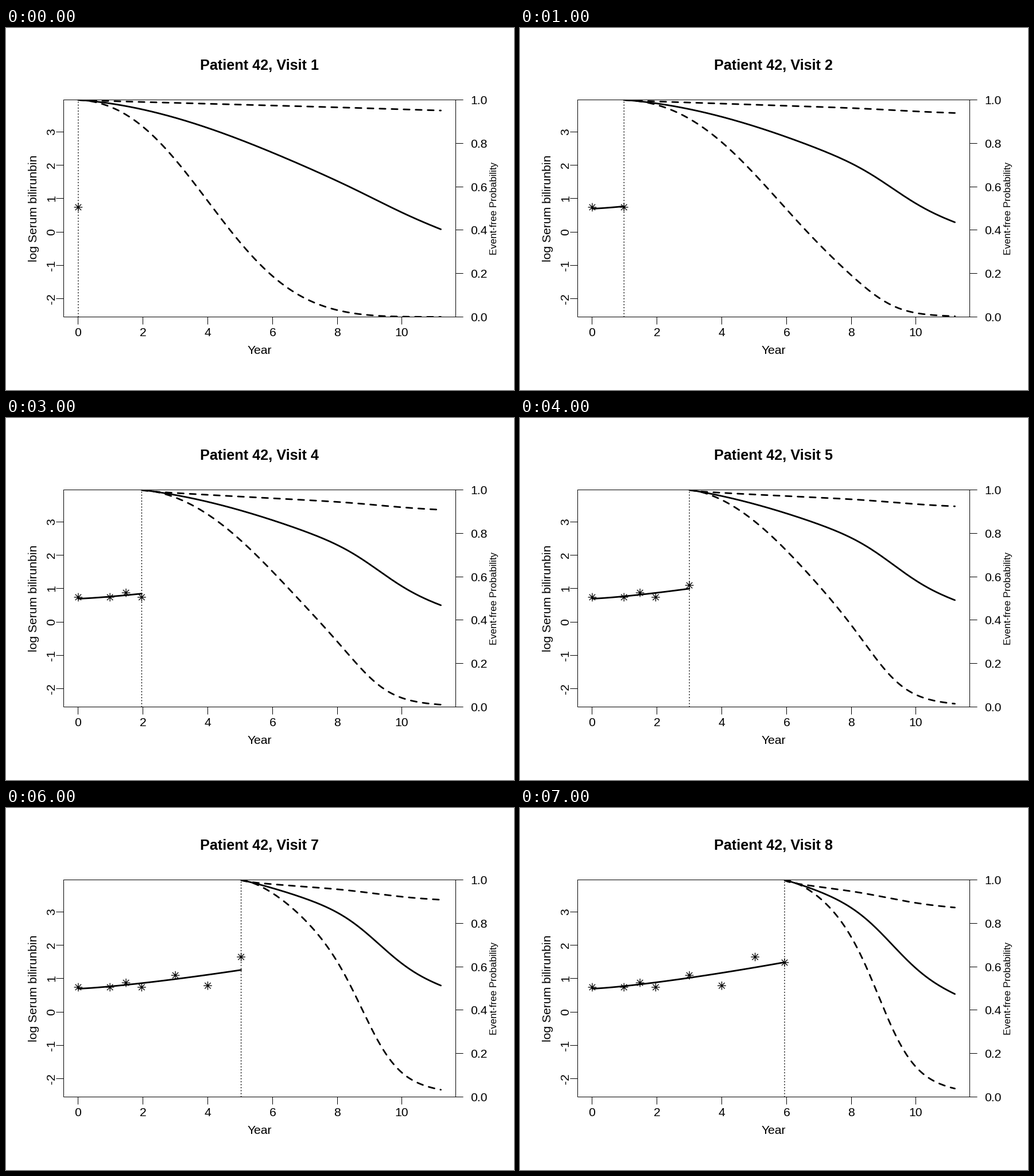
A matplotlib script for the animation above (8000 ms loop, 885x632 px).

```python
import numpy as np
import matplotlib.pyplot as plt
from collections import namedtuple
from matplotlib.animation import FuncAnimation
from matplotlib.patches import Rectangle

W, H = 885, 632
DPI = 72
LEFT, RIGHT, TOP, BOTTOM = 100.5, 783.5, 125.5, 504.5
THIN, THICK = 1, 2.8
DASH = 10.5
TICK = 12.6
SIZE = 21.07
LAST_YEAR = 11.2

plt.rcParams["font.family"] = "Liberation Sans"
plt.rcParams["axes.unicode_minus"] = False

times = np.array([0, 0.98, 1.475, 1.96, 3.0, 4.0, 5.03, 5.94])
bilirubin = np.log([2.1, 2.1, 2.4, 2.1, 3.0, 2.2, 5.2, 4.4])

# level: fitted value at the visit; base, slope, bump: hazard terms;
# worse, better: how far the dashed limits stand from the middle curve
Visit = namedtuple("Visit", "level base slope bump worse better")
visits = [
    Visit(0.70, 0.011, 0.0118, 0.045, 10, 0.053),
    Visit(0.77, 0.011, 0.0105, 0.175, 7.3, 0.069),
    Visit(0.86, 0.014, 0.0132, 0.150, 7.0, 0.120),
    Visit(0.85, 0.018, 0.0095, 0.193, 6.7, 0.112),
    Visit(1.00, 0.024, 0.0095, 0.200, 6.8, 0.095),
    Visit(0.97, 0.0225, 0.003, 0.195, 7.2, 0.081),
    Visit(1.26, 0.035, 0.010, 0.270, 6.0, 0.120),
    Visit(1.49, 0.042, 0.016, 0.315, 4.9, 0.160),
]


def year_x(t):
    return 125.9 + 56.4 * t


def log_y(v):
    return 356.2 - 58.3 * v


def prob_y(p):
    return BOTTOM - (BOTTOM - TOP) * p


def crisp(v):
    """Centre of the pixel that holds v."""
    return np.floor(v) + 0.5


def forecast(k):
    """Event-free curves after visit k: middle, lower and upper limit."""
    v = visits[k]
    t = np.linspace(times[k], LAST_YEAR, 200)
    peak = np.exp(-((t - 9.5) / 0.94) ** 2 / 2) / (0.94 * np.sqrt(2 * np.pi))
    hazard = v.base + v.slope * (t - t[0]) + v.bump * peak
    steps = (hazard[1:] + hazard[:-1]) / 2 * np.diff(t)
    risk = np.concatenate([[0], np.cumsum(steps)])
    risks = dict(mid=risk, low=v.worse * risk ** 1.4, high=v.better * risk ** 0.55)
    return {name: (year_x(t), prob_y(np.exp(-r))) for name, r in risks.items()}


def fitted(k):
    """Gently bending trend through the values seen so far."""
    if k == 0:
        return [], []
    s = np.linspace(0, 1, 40)
    return year_x(times[k] * s), log_y(0.7 + (visits[k].level - 0.7) * s ** 1.3)


def star_strokes(n):
    """Eight-armed stars as one broken line."""
    xs, ys = [], []
    a, b = 6.7, 4.74
    for x, y in zip(year_x(times[:n]), log_y(bilirubin[:n])):
        for dx, dy in [(a, 0), (0, a), (b, b), (b, -b)]:
            xs += [x - dx, x + dx, np.nan]
            ys += [y - dy, y + dy, np.nan]
    return xs, ys


fig = plt.figure(figsize=(W / DPI, H / DPI), dpi=DPI, facecolor="white")
ax = fig.add_axes([0, 0, 1, 1])
ax.set_xlim(0, W)
ax.set_ylim(H, 0)
ax.axis("off")


def line(xs=(), ys=(), **kw):
    kw = {"color": "black", "lw": THIN, "snap": False, **kw}
    return ax.plot(xs, ys, **kw)[0]


def label(x, y, s, size=SIZE, ha="center", **kw):
    return ax.text(x, y, s, fontsize=size, ha=ha, va="baseline",
                   rotation_mode="anchor", **kw)


# Frame, axes and labels
line([LEFT, RIGHT, RIGHT, LEFT, LEFT], [TOP, TOP, BOTTOM, BOTTOM, TOP],
     solid_joinstyle="miter")
for t in range(0, 11, 2):
    x = crisp(year_x(t))
    line([x, x], [BOTTOM, BOTTOM + TICK])
    label(x, 538.5, str(t))
for v in range(-2, 4):
    y = crisp(log_y(v))
    line([LEFT - TICK, LEFT], [y, y])
    label(85, y, str(v), rotation=90)
for p in np.arange(6) / 5:
    y = crisp(prob_y(p))
    line([RIGHT, RIGHT + TICK], [y, y])
    label(809, y + 7.5, f"{p:.1f}", ha="left")
label(442, 569, "Year")
label(54.5, 315.2, "log Serum bilirunbin", rotation=90)
label(855.5, 315.2, "Event-free Probability", 0.8 * SIZE, rotation=90)
title = label(441.5, 73.3, "", 1.2 * SIZE, weight="bold")

# Moving parts, clipped to the plot box
solid = dict(lw=THICK, solid_capstyle="round")
dashed = dict(lw=THICK, ls=(0, (DASH / THICK, DASH / THICK)), dash_capstyle="round")
curves = {"fit": line(**solid), "mid": line(**solid),
          "low": line(**dashed), "high": line(**dashed)}
now_line = line(lw=1.3, ls=(0, (1, 3)), dash_capstyle="round")
stars = line(lw=1.3)
clip = Rectangle((LEFT, TOP), RIGHT - LEFT, BOTTOM - TOP, transform=ax.transData)
for part in [*curves.values(), now_line, stars]:
    part.set_clip_path(clip)


def draw(k):
    title.set_text(f"Patient 42, Visit {k + 1}")
    shapes = {"fit": fitted(k), **forecast(k)}
    for name, curve in curves.items():
        curve.set_data(*shapes[name])
    x = year_x(times[k])
    now_line.set_data([x, x], [BOTTOM, TOP])
    stars.set_data(*star_strokes(k + 1))
    return [title, now_line, stars, *curves.values()]


anim = FuncAnimation(fig, draw, frames=len(visits), interval=1000,
                     repeat=True, repeat_delay=0, blit=False)
plt.show()
```
